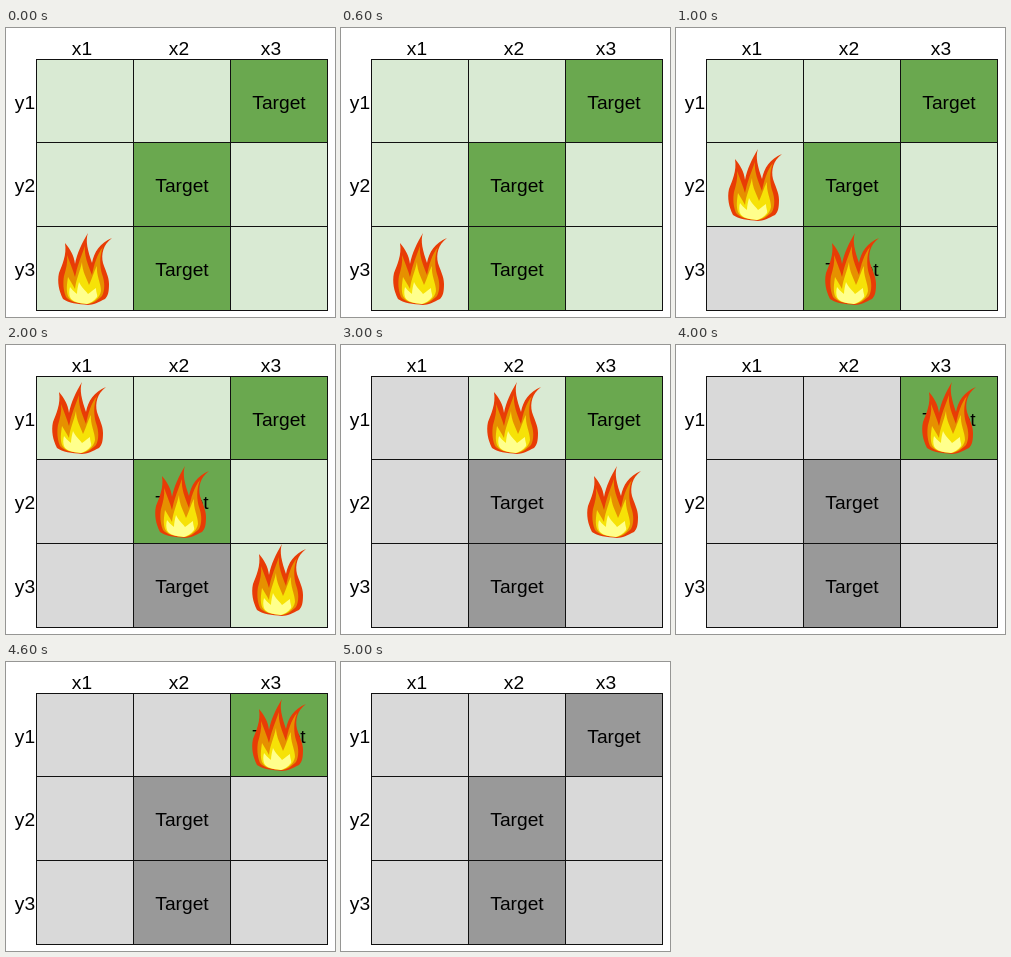
An HTML page that plays this animation: 329 by 289 pixels, repeating every 6 s.

```html
<!DOCTYPE html>
<html lang="en">
<head>
<meta charset="utf-8">
<title>Spreading fire grid</title>
<style>
  html, body { margin: 0; width: 100%; height: 100%; overflow: hidden; background: #fff; }
  svg { display: block; width: 329px; height: 289px; }
  text { font: 19.2px "Liberation Sans", Arial, sans-serif; text-anchor: middle; }
  .line { fill: #111; }
  .cell { --ash: #d9d9d9; fill: #d9ead3; }
  .cell.target { --ash: #999; fill: #6aa84f; }
  .cell, .flame { animation: 6s step-end infinite; }
  .flame { visibility: hidden; animation-name: flare; }
  @keyframes flare { 0% { visibility: visible; } 16.6666%, 100% { visibility: hidden; } }
  @keyframes burn0 { 16.6666%, 100% { fill: var(--ash); } }
  @keyframes burn1 { 33.3333%, 100% { fill: var(--ash); } }
  @keyframes burn2 { 50%, 100% { fill: var(--ash); } }
  @keyframes burn3 { 66.6666%, 100% { fill: var(--ash); } }
  @keyframes burn4 { 83.3333%, 100% { fill: var(--ash); } }
</style>
</head>
<body>
<svg id="stage" viewBox="0 0 329 289">
  <defs>
    <g id="fire">
      <path fill="#e83c06" d="M30 0C27 8 30 18 34 30C36 19 42 10 54 5C45 12 43 21 45 30C47 37 51 43 51 51C51 59 50 63 47 66C41 69 35 72 30 72C20 71 10 70 5 66C1 58-1 49 1 40C4 32 9 22 7 10C12 16 16 22 17 31C19 20 24 10 30 0Z"/>
      <path fill="#e69000" d="M27 13C26 22 30 32 34 42C36 32 39 21 45 14C41 24 42 34 44 41C47 49 47 57 44 63C39 68 34 71 29 71C20 70 12 69 8 64C5 57 5 49 6 43C8 36 10 29 9 22C12 30 15 37 17 44C19 33 23 24 27 13Z"/>
      <path fill="#f6e207" d="M24 29C24 38 29 46 31 52C34 46 36 38 39 33C38 42 43 50 43 58C42 65 35 70 29 71C20 70 13 69 10 63C8 57 9 51 10 44C13 49 15 52 17 56C18 46 22 39 24 29Z"/>
      <path fill="#ffff8c" d="M21 49C23 54 28 58 30 61C33 59 35 57 38 55C38 60 40 62 39 64C36 68 32 70 29 71C21 70 14 69 12 64C11 61 11 58 12 54C15 58 17 59 19 61C19 57 20 53 21 49Z"/>
    </g>
  </defs>
</svg>
<script>
  const stage = document.getElementById('stage');
  const xs = [30, 127, 224, 321];
  const ys = [31, 114, 198, 282];
  const columnCenters = [76, 173, 265];
  const baselines = [81, 164, 248];
  const targets = ['2,0', '1,1', '1,2'];

  function add(tag, attrs, text = '') {
    const node = document.createElementNS('http://www.w3.org/2000/svg', tag);
    for (const [key, value] of Object.entries(attrs)) node.setAttribute(key, value);
    node.textContent = text;
    stage.append(node);
  }

  function eachCell(draw) {
    for (let row = 0; row < 3; row++)
      for (let col = 0; col < 3; col++)
        // Fire spreads diagonally from the bottom-left cell.
        draw(col, row, col + 2 - row, targets.includes(`${col},${row}`));
  }

  eachCell((col, row, step, isTarget) => {
    add('rect', {
      x: xs[col], y: ys[row],
      width: xs[col + 1] - xs[col], height: ys[row + 1] - ys[row],
      class: isTarget ? 'cell target' : 'cell',
      style: `animation-name: burn${step}`
    });
    if (isTarget) add('text', { x: xs[col] + 49, y: baselines[row] }, 'Target');
  });

  for (let i = 0; i < 3; i++) {
    add('text', { x: columnCenters[i], y: 27 }, `x${i + 1}`);
    add('text', { x: 19, y: baselines[i] }, `y${i + 1}`);
  }
  for (const x of xs) add('rect', { x, y: 31, width: 1, height: 252, class: 'line' });
  for (const y of ys) add('rect', { x: 30, y, width: 292, height: 1, class: 'line' });

  eachCell((col, row, step) => {
    const x = 52 + col * 97 - (row === 0 ? 6 - 3 * col : 0);
    const y = col === 2 && row === 2 ? 199 : 37 + row * 84;
    add('use', { href: '#fire', x, y, class: 'flame', style: `animation-delay: ${step - 6}s` });
  });
</script>
</body>
</html>
```
